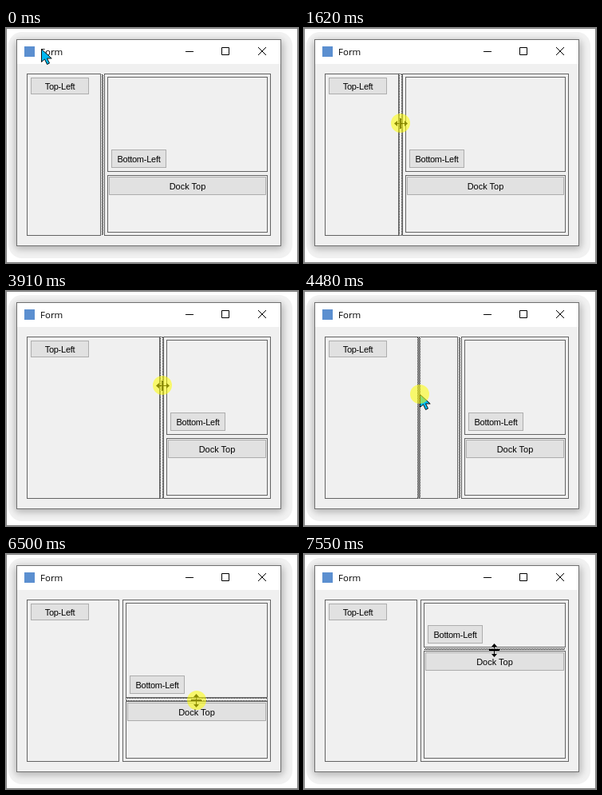
An HTML page that plays this animation: 366x294 px, repeating every 8000 ms.

```html
<!DOCTYPE html>
<html lang="en">
<head>
<meta charset="utf-8">
<title>Split panels</title>
<style>
html, body { margin: 0; width: 100%; height: 100%; overflow: hidden; background: #fff; }
svg { display: block; width: 366px; height: 294px; }
text { font: 11px "Liberation Sans", Arial, sans-serif; fill: #000; text-anchor: middle; }
.title { font: 11.5px "Open Sans", "Noto Sans", sans-serif; text-anchor: start; }
.tight { letter-spacing: -.25px; }
.panel { fill: none; stroke: #646464; }
.button { fill: #e1e1e1; stroke: #adadad; }
.hover { fill: #e5f1fb; stroke: #0078d7; }
.dots { fill: url(#checker); mix-blend-mode: difference; }
</style>
</head>
<body>
<svg viewBox="0 0 366 294">
  <defs>
    <pattern id="checker" width="2" height="2" patternUnits="userSpaceOnUse" shape-rendering="crispEdges">
      <path d="M0 0h1v1h-1zM1 1h1v1h-1z" fill="#fff"/>
    </pattern>
    <filter id="soft" x="-10%" y="-10%" width="120%" height="120%"><feGaussianBlur stdDeviation="4"/></filter>
  </defs>
  <rect width="366" height="294" fill="#fff"/>
  <rect x="3" y="5" width="356" height="283" rx="17" fill="#f1f1f1"/>
  <rect x="11" y="15" width="337" height="262" rx="6" fill="#000" opacity=".24" filter="url(#soft)"/>
  <rect x=".5" y=".5" width="365" height="293" fill="none" stroke="#808080"/>

  <rect x="13.5" y="14.5" width="331" height="258" fill="#f0f0f0" stroke="#707070"/>
  <rect x="14" y="15" width="330" height="30" fill="#fff"/>
  <rect x="23" y="23" width="13" height="13" fill="#5b8fd0"/>
  <text class="title" x="43" y="34">Form</text>
  <path d="M225 29.5h10M270.5 24.5h9v9h-9zM316 24l10 10M326 24l-10 10" fill="none" stroke="#000"/>

  <g id="form"></g>
  <g id="lines"></g>
  <g id="pointer">
    <path id="arrow" d="M.5 .5V16.5L4.5 13L7.5 19.5L10.5 18L7.5 12H13.2Z" fill="#00b9f2" stroke="#111"/>
    <path id="sizer" d="M-8 .5L-4 -3V0H-1V-6H1V0H5V-3L9 .5L5 4V1H1V7H-1V1H-4V4Z" fill="#000"/>
    <circle id="press" r="12" fill="#ff0" fill-opacity=".55"/>
  </g>
</svg>
<script>
const LOOP = 8000;
const $ = id => document.getElementById(id);

function add(parent, tag, cls) {
  const el = document.createElementNS("http://www.w3.org/2000/svg", tag);
  el.setAttribute("class", cls);
  return parent.appendChild(el);
}
function set(el, attrs) {
  for (const key in attrs) el.setAttribute(key, attrs[key]);
}
function show(el, on) {
  el.style.display = on ? "" : "none";
}
function box(el, x, y, w, h) {
  set(el, { x: x + .5, y: y + .5, width: w - 1, height: h - 1 });
}
function fill(el, x, y, width, height) {
  set(el, { x, y, width, height });
}
function makeButton(label, cls) {
  const rect = add($("form"), "rect", "button");
  const text = add($("form"), "text", cls);
  text.textContent = label;
  return { rect, text };
}
function placeButton(b, x, y, w, h, px, py, active) {
  box(b.rect, x, y, w, h);
  set(b.text, { x: x + w / 2, y: y + Math.round(h / 2) + 4 });
  const over = active && px >= x && px < x + w && py >= y && py < y + h;
  b.rect.setAttribute("class", over ? "button hover" : "button");
}

const [left, right, top_, bottom] = [0, 1, 2, 3].map(() => add($("form"), "rect", "panel"));
const topLeft = makeButton("Top-Left", "tight");
const bottomLeft = makeButton("Bottom-Left", "tight");
const dockTop = makeButton("Dock Top", "");
const [focus, ghost, drag] = [0, 1, 2].map(() => add($("lines"), "rect", "dots"));

const linear = p => p;
const smooth = p => p * p * (3 - 2 * p);
const easeIn = p => p ** 2.66;
const easeOut = n => p => 1 - (1 - p) ** n;

// start, end, steps, target x, target y, easing of x, easing of y
const moves = [
  [300, 1020, 16, 120, 117, smooth],
  [1300, 1300, 1, 120, 118, linear],
  [1440, 1440, 1, 121, 119, linear],
  [1810, 2610, 16, 192, 122, easeIn, easeOut(2)],
  [2660, 2660, 1, 195, 119, linear],
  [3120, 3120, 1, 196, 118, linear],
  [4010, 4480, 11, 145, 129, smooth],
  [5040, 5800, 16, 228, 177, easeOut(2.16), easeOut(2.8)],
  [5850, 6180, 6, 239, 183, linear],
  [6650, 7410, 17, 239, 120, smooth]
];

// press, first move, release, start x, start y
const drags = [
  [1620, 1810, 3120, 121, 119],
  [3910, 4010, 4620, 196, 118],
  [6500, 6650, 7550, 239, 183]
];

function pointerAt(t) {
  let x = 44, y = 26;
  for (const [start, end, steps, tx, ty, ex, ey = ex] of moves) {
    if (t < start) break;
    const gap = (end - start) / (steps - 1) || 1;
    const p = Math.min(1, (Math.floor((t - start) / gap + .1) + 1) / steps);
    x += (tx - x) * ex(p);
    y += (ty - y) * ey(p);
  }
  return [Math.round(x), Math.round(y)];
}

function draw(t) {
  const [px, py] = pointerAt(t);
  const sx = t < 3120 ? 119 : t < 4620 ? 193 : 142;
  const sy = t < 7550 ? 180 : 117;
  const horizontal = t >= 6500;
  const held = drags.find(d => t >= d[0] && t < d[2]);
  const moving = held && t >= held[1];

  box(left, 26, 57, sx - 26, 203);
  box(right, sx + 4, 57, 328 - sx, 203);
  box(top_, sx + 8, 61, 320 - sx, sy - 61);
  box(bottom, sx + 8, sy + 4, 320 - sx, 252 - sy);
  placeButton(topLeft, 31, 62, 73, 21, px, py, !held);
  placeButton(bottomLeft, sx + 13, sy - 28, 69, 23, px, py, !held);
  placeButton(dockTop, sx + 10, sy + 6, 316 - sx, 23, px, py, !held);

  if (horizontal) fill(focus, sx + 9, sy + 1, 318 - sx, 2);
  else fill(focus, sx + 1, 58, 2, 201);

  show(drag, held);
  show(ghost, moving && horizontal);
  fill(ghost, sx + 8, sy, 320 - sx, 4);
  if (held) {
    if (horizontal) fill(drag, sx + 8, sy + py - held[4], 320 - sx, 4);
    else fill(drag, sx + px - held[3], 57, 4, 203);
  }

  const overV = px >= sx && px < sx + 4 && py >= 57 && py < 260;
  const overH = py >= sy && py < sy + 4 && px >= sx + 8 && px < 328;
  const sizing = !moving && (overV || overH);
  set($("pointer"), { transform: `translate(${px} ${py})` });
  set($("sizer"), { transform: overH ? "rotate(90)" : "" });
  show($("sizer"), sizing);
  show($("arrow"), !sizing);
  show($("press"), held);
}

function tick() {
  draw(performance.now() % LOOP);
  requestAnimationFrame(tick);
}
tick();
</script>
</body>
</html>
```
